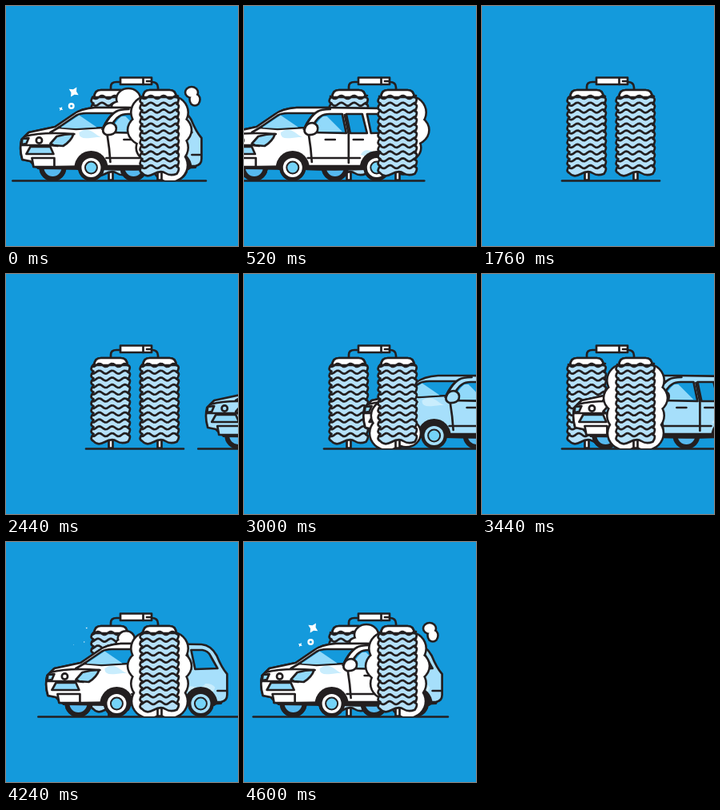
An HTML page that plays this animation: 290x300 px, repeating every 4640 ms.

```html
<!DOCTYPE html>
<html>
<head>
<meta charset="utf-8">
<title>Car wash</title>
<style>
html, body { margin: 0; width: 100%; height: 100%; overflow: hidden; background: #149adc; }
svg { display: block; width: 100vw; height: 100vh; }
.ink { stroke: #231f20; stroke-width: 2.7; stroke-linejoin: round; stroke-linecap: round; }
.none { fill: none; }
.body { fill: var(--paint); }
.glass { fill: #149adc; }
.shine { fill: #91d9fa; }
.dark { fill: #231f20; }
.splash { fill: #c9edfd; }
</style>
</head>
<body>
<svg viewBox="0 0 290 300">
  <defs>
    <clipPath id="washed"><rect x="-10" width="202" height="300"/></clipPath>
    <clipPath id="floor"><rect x="-500" width="1200" height="218"/></clipPath>
    <g id="car" clip-path="url(#floor)">
      <g id="farWheels"></g>
      <path class="dark" d="M34 196H242L238 203Q180 207 120 205L40 204Z"/>
      <path class="body ink" d="M21 192Q17 179 20 167L29 158L62 151L84 136Q94 128 112 127H150L213 128Q225 129 232 142Q238 157 245 165V191Q245 199 237 200H125L64 201H38L31 194Z"/>
      <path class="splash" d="M92 158q9-7 18 0t10 6-14 1-14-7M192 186q4-8 12-5t14-4q9 0 12 5l-3 6q-16 4-35-2"/>
      <path class="glass ink" d="M66 152L88 137Q93 134 101 134H135Q127 141 122 152L88 154Z"/>
      <path class="shine" d="M69 152L92 136.500L114 151.500L88 153Z"/>
      <path class="ink none" d="M121 154Q130 136 138 132Q143 129 154 129"/>
      <path class="glass ink" d="M128 158Q136 141 142 138Q146 135 153 135H169L174 159ZM174 135H194L200 159H179ZM200 135H214Q221 136 224 142L233 158L205 159Z"/>
      <path class="shine" d="M131 157Q139 142 145 138L150 138L169 157Z"/>
      <path class="ink none" d="M172 136L177 160V196M127 160Q130 178 131 195M148 167H160M183 167H195M126 190H191M233 186H244"/>
      <path class="body ink" d="M122 154Q124 146 132 146Q140 148 138 156Q135 162 126 161Q121 159 122 154Z"/>
      <path class="ink none" d="M24 163Q46 157 86 160M68 151L56 158M20 174H56L65 175"/>
      <path class="shine ink" d="M56 172L64 163Q74 160 85 160Q82 169 72 175L60 174ZM21 166L29 165L26 172L20 173Z"/>
      <path class="shine ink" d="M31 176H56L60 185H26Z"/>
      <circle class="body ink" cx="42" cy="168" r="3.6"/>
      <path class="body ink" d="M33 190H61V201H35Z"/>
      <g id="nearWheels"></g>
    </g>
  </defs>
  <path id="ground" class="ink none"/>
  <g id="leftBrush"></g>
  <g id="backFoam"></g>
  <use id="dirty" href="#car" style="--paint:#a6dffb"/>
  <g clip-path="url(#washed)"><use id="clean" href="#car" style="--paint:#fff"/></g>
  <g id="frontFoam" clip-path="url(#floor)"></g>
  <g id="rightBrush"></g>
  <path class="ink none" d="M131 104V101Q131 95 138 95H143M182 95Q190 95 190 102V104"/>
  <path class="ink" fill="#fff" d="M143 89.5H182V98H143Z"/>
  <path class="ink none" d="M171.5 90V98M176 94H181"/>
  <path id="sparkles" fill="#fff" fill-rule="evenodd"/>
</svg>
<script>
const LOOP = 4640, START = 2240;
const INK = '#231f20';
const $ = id => document.getElementById(id);
const mix = (a, b, s) => a + (b - a) * s;

function ease(t, a, b) {
  const s = Math.min(1, Math.max(0, (t - a) / (b - a)));
  return s * s * (3 - 2 * s);
}

// Rises at time a, falls at time b
const pulse = (t, a, b) => ease(t, a, a + 300) - ease(t, b, b + 300);

// Steady crawl through the brushes, quick arrival and departure
function carX(t) {
  const arrive = Math.max(0, (3000 - t) / 560), leave = Math.max(0, (t - 4640) / 1040);
  return 49.5 - 0.08 * (t - 4240) + 56 * arrive ** 2 - 32 * leave ** 3;
}

// Ellipses [cx, cy, rx, ry] merged under one outline
function foam(shapes) {
  const seen = shapes.filter(e => Math.min(e[2], e[3]) > 2);
  const layer = (grow, fill) => seen.map(([x, y, rx, ry]) =>
    `<ellipse cx="${x}" cy="${y}" rx="${rx + grow}" ry="${ry + grow}" fill="${fill}"/>`).join('');
  return layer(1.3, INK) + layer(-1.3, '#fff');
}

// Lobes swell from the bottom up on one side of the right brush
function lobes(t, side, from, to, fade) {
  return [0, 1, 2, 3].map(i => {
    const g = pulse(t, from + (3 - i) * 110, to - i * fade);
    const r = 24 + 3 * Math.cos(i * 2 - 2);
    return [192 + side * 13 * g, 133 + i * 22, r * g, 21 * g];
  });
}

function frontFoam(t) {
  const fly = ease(t, 4200, 4600), g = pulse(t, 4150, 4900);
  return [
    ...lobes(t, -1, 2640, 5000, 220),
    ...lobes(t, 1, 2780, 5200, 60),
    [mix(214, 232, fly), mix(128, 108, fly), 8 * g, 7 * g],
    [mix(214, 236, fly), mix(130, 117, fly), 6.5 * g, 7.5 * g]
  ];
}

function backFoam(t) {
  const grow = ease(t, 3840, 4600), g = pulse(t, 3500, 4900);
  return [
    [mix(147, 153, grow), mix(126, 116, grow), mix(5, 15, grow) * g, mix(5, 13, grow) * g],
    [mix(147, 143, grow), mix(127, 125, grow), mix(3, 11, grow) * g, mix(3, 6, grow) * g]
  ];
}

function wave(x, y, phase) {
  let d = '';
  for (let i = 0; i <= 46; i += 2) {
    d += `${i ? 'L' : 'M'}${x + i} ${(y + 2 * Math.sin(i * Math.PI / 8 + phase)).toFixed(2)}`;
  }
  return d;
}

function brush(x, t) {
  const phase = t / LOOP * 16 * Math.PI, pitch = 8.7, rows = 11;
  const cap = `M${x + 4} 114Q${x + 4} 105 ${x + 12} 105H${x + 37}Q${x + 45} 105 ${x + 45} 114`;
  let edge = cap, lines = '';
  for (let r = 0; r < rows; r++) {
    edge += `Q${x + 51} ${115 + r * pitch} ${x + 46} ${114 + (r + 1) * pitch}`;
    lines += wave(x + 1.5, 114 + r * pitch, phase);
  }
  edge += `Q${x + 38} 213 ${x + 32} 209T${x + 17} 210T${x + 3} 209`;
  for (let r = rows - 1; r >= 0; r--) edge += `Q${x - 3} ${119 + r * pitch} ${x + 3} ${113 + r * pitch}`;
  return `<path class="ink" fill="#fff" d="M${x + 22} 207h5v10.500h-5z"/>` +
    `<path class="ink" fill="#b6e1f9" d="${edge}Z"/>` +
    `<path class="ink" fill="#fff" d="${cap}Z"/>` +
    `<path class="ink none" d="${lines}"/>`;
}

function star(x, y, r) {
  let d = '';
  for (let i = 0; i < 8; i++) {
    const a = 0.55 + i * Math.PI / 4, k = i % 2 ? r * 0.48 : r;
    d += `${i ? 'L' : 'M'}${x + k * Math.cos(a)} ${y + k * Math.sin(a)}`;
  }
  return d + 'Z';
}

function ring(x, y, r) {
  const disc = k => `M${x - k} ${y}a${k} ${k} 0 1 0 ${2 * k} 0a${k} ${k} 0 1 0 ${-2 * k} 0Z`;
  return disc(r) + disc(r * 0.4);
}

function wheel(x, near) {
  const y = 202;
  const disc = (r, fill) => `<circle cx="${x}" cy="${y}" r="${r}" style="fill:${fill}"/>`;
  return near
    ? `<path class="dark" d="M${x - 21} ${y}a21 21 0 0 1 42 0l-4 3h-34z"/>` +
      disc(16.5, INK) + disc(12, 'var(--paint)') + disc(8.5, INK) + disc(6.5, '#74d3f8')
    : disc(17, INK) + disc(11, '#56b9ef');
}

$('farWheels').innerHTML = wheel(59) + wheel(160);
$('nearWheels').innerHTML = wheel(107, true) + wheel(212, true);

function draw(ms) {
  const now = ms % LOOP;
  const t = START + (now - START + LOOP) % LOOP;
  const x = carX(t), shift = `translate(${(x - 18).toFixed(2)} 0)`;
  $('dirty').setAttribute('transform', shift);
  $('clean').setAttribute('transform', shift);

  // The floor line stretches with the car and settles under the brushes
  const front = x - 9;
  const left = t > 6000 ? Math.min(100, Math.max(-5, 100 - (6400 - t) * 0.19)) : Math.min(100, front);
  const right = Math.min(330, 222 + 33 * Math.exp((4600 - t) / 243));
  $('ground').setAttribute('d', front > 222
    ? `M100 218.500H222M${front} 218.500H330`
    : `M${left} 218.500H${right}`);

  $('leftBrush').innerHTML = brush(106.5, now);
  $('rightBrush').innerHTML = brush(167.5, now);
  $('backFoam').innerHTML = foam(backFoam(t));
  $('frontFoam').innerHTML = foam(frontFoam(t));

  const glow = pulse(t, 4160, 4780), sx = (x - 18) * 0.5;
  $('sparkles').setAttribute('d', glow > 0.02
    ? star(85 + sx, 107.5, 7 * glow) + ring(82 + sx, 125, 4 * glow) + star(69 + sx, 128.5, 2.8 * glow)
    : '');
}

const origin = performance.now();
function tick() {
  draw(performance.now() - origin);
  requestAnimationFrame(tick);
}
tick();
</script>
</body>
</html>
```
